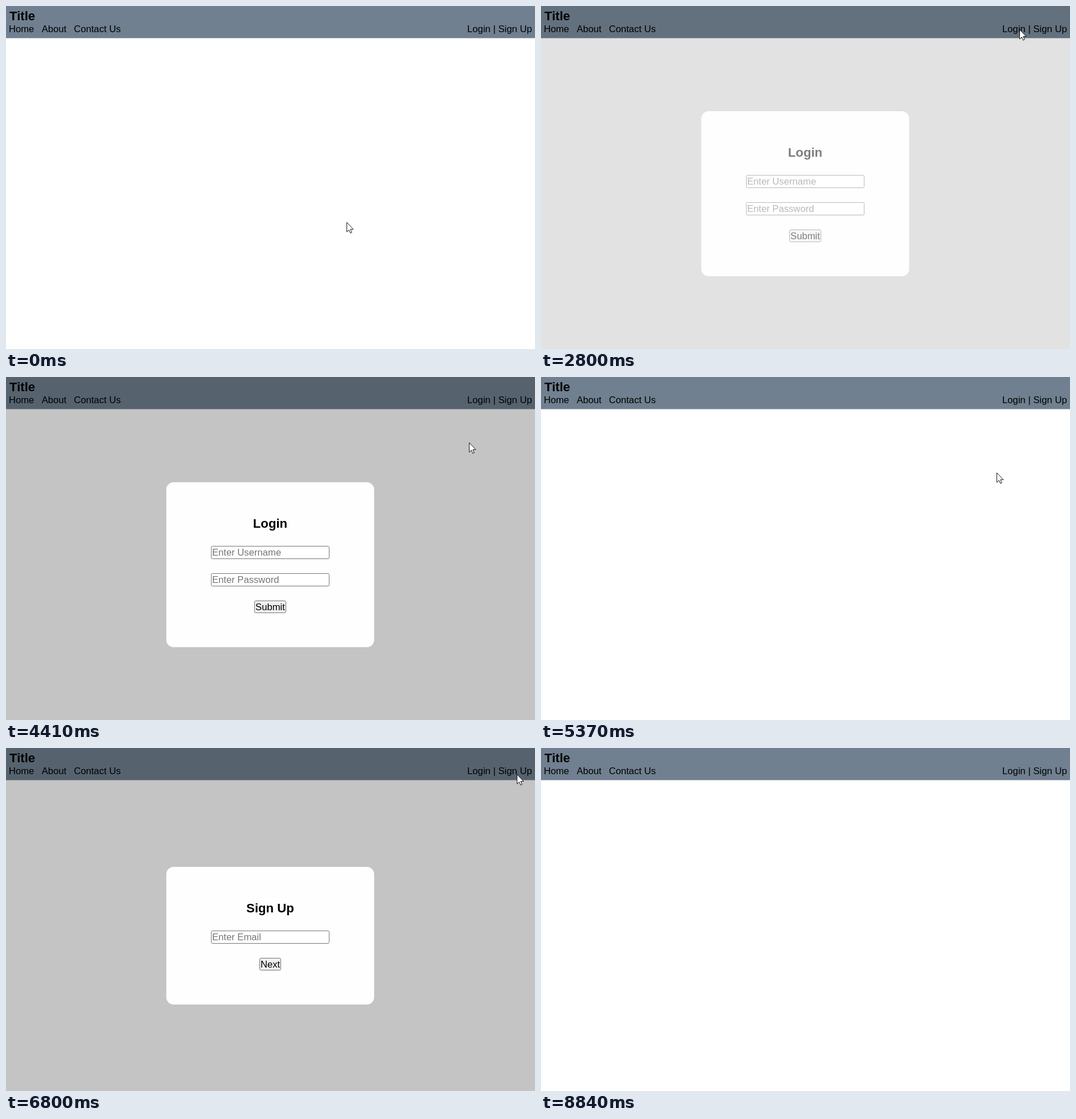
Animation of 929 by 603 pixels, one loop 9.46 s. Source, as an HTML page:

```html
<!DOCTYPE html>
<html lang="en">
<head>
<meta charset="utf-8">
<title>Login and sign up dialogs</title>
<style>
  html, body { margin: 0; width: 100%; height: 100%; overflow: hidden; background: #fff; }
  svg { display: block; width: 929px; height: 603px; font: 16.67px "Liberation Sans", Arial, sans-serif; }
  .bold { font-weight: bold; font-size: 22.2px; }
  .mid { text-anchor: middle; }
  .hint { fill: #757575; }
  .box { fill: #fff; stroke: #767676; }
  .button { fill: #efefef; stroke: #767676; }
  .cursor { fill: #fff; stroke: #000; stroke-linejoin: round; }
</style>
</head>
<body>
<svg viewBox="0 0 929 603">
  <rect width="929" height="603" fill="#fff"/>
  <rect width="929" height="56.5" fill="#708090"/>
  <text class="bold" x="6" y="25">Title</text>
  <text x="4.9" y="46">Home</text>
  <text x="62.7" y="46">About</text>
  <text x="119.2" y="46">Contact Us</text>
  <text x="923.7" y="46" text-anchor="end">Login | Sign Up</text>
  <g id="login"></g>
  <g id="signup"></g>
  <g id="cursor" class="cursor">
    <path id="arrow" d="M.5.5V17.2L4.3 13.6L6.8 19.2L9.3 18.1L6.9 12.6H12Z" stroke-width=".9"/>
    <path id="hand" d="M-1.5 14V2Q-1.5.5 0 .5T1.5 2V8Q3 6.8 4.5 8.5Q6 7.5 7.3 9.2Q10.3 8.8 10.3 11.5V16Q10.3 19 8.5 20.5V23H-1V21L-6 14.5Q-6.8 12.8-5.2 12Q-3.8 11.6-1.5 14Z"/>
  </g>
</svg>
<script>
const LOOP = 9460, STEP = 70, CENTER = 464, ROW = 48;
const $ = id => document.getElementById(id);

// Rows of a title, fields and a button, centred on the stage.
function dialog(id, title, hints, label, width) {
  const height = 194 + ROW * hints.length;
  const top = 330 - height / 2;
  const fields = hints.map((hint, i) => {
    const y = top + 112.5 + ROW * i;
    return `<rect class="box" x="${CENTER - 103.5}" y="${y}" width="207" height="22" rx="2"/>
      <text class="hint" x="361.9" y="${y + 16.5}">${hint}</text>`;
  }).join("");
  const y = top + height - 81.5;
  $(id).innerHTML = `<rect width="929" height="603" opacity=".233"/>
    <rect x="${CENTER - 182.5}" y="${top}" width="365" height="${height}" rx="13" fill="#fefefe"/>
    <text class="bold mid" x="${CENTER}" y="${top + 80}">${title}</text>${fields}
    <rect class="button" x="${CENTER - width / 2}" y="${y}" width="${width}" height="21" rx="2"/>
    <text class="mid" x="${CENTER}" y="${y + 16.5}">${label}</text>`;
}
dialog("login", "Login", ["Enter Username", "Enter Password"], "Submit", 55);
dialog("signup", "Sign Up", ["Enter Email"], "Next", 37);

// Pointer moves: start time, number of steps, Bezier points.
const moves = [
  { start: 850, steps: 14, path: [[598, 380], [490, 330], [564, 154], [765, 90]] },
  { start: 1840, steps: 9, path: [[765, 90], [815, 45], [840, 20], [840, 41]] },
  { start: 3570, steps: 21, path: [[840, 41], [816, 95], [800, 168]] },
  { start: 5700, steps: 11, path: [[800, 168], [850, 90], [950, -2], [897, 46]] },
  { start: 7530, steps: 14, path: [[897, 46], [880, 95], [841, 148]] },
  { start: 8640, steps: 3, path: [[841, 148], [932, 150]] }
];

// Point at u on a Bezier curve of any degree.
function bezier(points, u) {
  if (points.length === 1) return points[0];
  const next = points.slice(1).map(([x, y], i) =>
    [points[i][0] + (x - points[i][0]) * u, points[i][1] + (y - points[i][1]) * u]);
  return bezier(next, u);
}

function pointer(t) {
  const { start, steps, path } = moves.filter(m => t >= m.start).pop() || moves[0];
  const step = Math.floor((t - start) / STEP) + 1;
  return bezier(path, Math.max(0, Math.min(1, step / steps)));
}

const within = (t, from, to) => t >= from && t < to;

// Two-step fade in and out.
function fade(t, on, full, off, gone) {
  if (!within(t, on, gone)) return 0;
  return within(t, full, off) ? 1 : 0.5;
}

function draw(t) {
  $("login").setAttribute("opacity", fade(t, 2800, 2930, 5300, 5370));
  $("signup").setAttribute("opacity", fade(t, 6670, 6800, 8510, 8580));
  const [x, y] = pointer(t).map(Math.round);
  const linked = within(t, 2060, 2600) || within(t, 6120, 6670);
  $("cursor").setAttribute("transform", `translate(${x} ${y})`);
  $("cursor").setAttribute("visibility", t < 8835 ? "visible" : "hidden");
  $("arrow").setAttribute("display", linked ? "none" : "inline");
  $("hand").setAttribute("display", linked ? "inline" : "none");
}

const begin = performance.now();
function tick() {
  draw((performance.now() - begin) % LOOP);
  requestAnimationFrame(tick);
}
draw(0);
requestAnimationFrame(tick);
</script>
</body>
</html>
```
